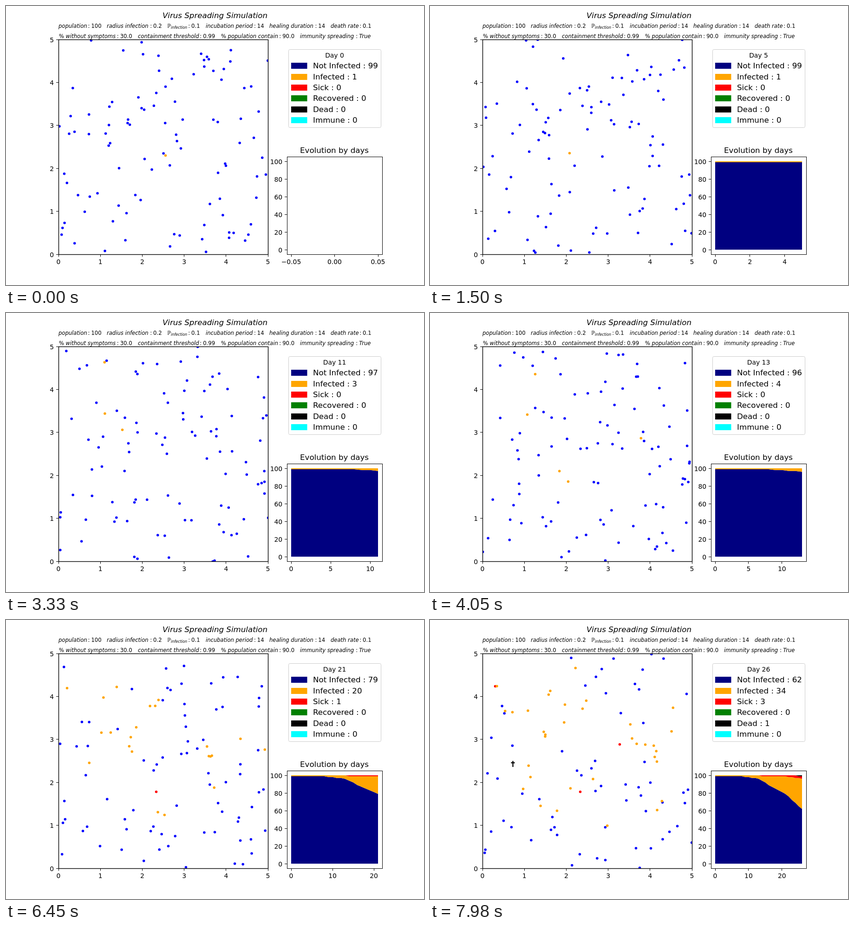
Animation, 900 px wide and 600 px high, one loop 8 s. Source, as an HTML page:

```html
<!DOCTYPE html>
<html lang="en">
<head>
<meta charset="utf-8">
<title>Virus Spreading Simulation</title>
<style>
  html, body { margin: 0; width: 100%; height: 100%; overflow: hidden; background: #fff; }
  svg { display: block; width: 900px; height: 600px; font: 13.89px "DejaVu Sans", sans-serif; }
  .big { font-size: 16.67px; }
  .small { font-size: 11.57px; }
  .it { font-style: italic; }
  .mid { text-anchor: middle; }
  .end { text-anchor: end; }
  .line { fill: none; stroke: #000; }
</style>
</head>
<body>
<svg id="stage" viewBox="0 0 900 600"></svg>
<script>
const LOOP = 8000, STEP = 30, FRAMES = 267, PEOPLE = 100, LAST_DAY = 26;
const BOX = { left: 113, right: 564, top: 72, bottom: 534 };
const stage = document.getElementById('stage');

function add(tag, attrs, text, parent = stage) {
  const el = document.createElementNS('http://www.w3.org/2000/svg', tag);
  for (const key in attrs) el.setAttribute(key, attrs[key]);
  if (text !== undefined) el.textContent = text;
  parent.append(el);
  return el;
}
const label = (x, y, text, cls = '', parent) => add('text', { x, y, class: cls }, text, parent);
const clamp = (v, lo, hi) => Math.min(hi, Math.max(lo, v));

function seeded(seed) {
  return () => {
    seed = (seed + 0x6D2B79F5) | 0;
    let t = Math.imul(seed ^ seed >>> 15, 1 | seed);
    t = t + Math.imul(t ^ t >>> 7, 61 | t) ^ t;
    return ((t ^ t >>> 14) >>> 0) / 4294967296;
  };
}
const random = seeded(20);

// Linear interpolation through keys [time, value, ...]
function along(keys, time) {
  const n = keys.findIndex(key => key[0] > time);
  if (n < 0) return keys.at(-1).slice(1);
  const a = keys[Math.max(0, n - 1)], b = keys[n];
  const k = a === b ? 0 : (time - a[0]) / (b[0] - a[0]);
  return a.slice(1).map((v, i) => v + (b[i + 1] - v) * k);
}

// The first patients: key points [frame, x, y]; each falls sick and stops at the last one
const patients = [
  [[0, 343, 321], [50, 300, 316], [88, 205, 144], [135, 297, 362], [137, 323, 369]],
  [[0, 252, 95], [88, 198, 81], [135, 226, 131], [215, 131, 146], [237, 140, 142]],
  [[0, 228, 206], [135, 209, 218], [217, 178, 309]],
  [[0, 446, 244], [174, 456, 276], [257, 408, 267]]
];
const DEAD = 2, DEAD_FROM = 247;
const stillPeople = [
  [178, 275], [169, 442], [473, 343], [559, 362], [259, 445],
  [278, 406], [460, 414], [343, 173], [446, 139], [540, 366]
];

// Daily totals
const dayAt = frame => Math.min(LAST_DAY, Math.floor((frame + 3) / 10));
const sickFrame = i => i < patients.length ? patients[i].at(-1)[0] : Infinity;
const healthyCurve = [[8, 99], [13, 96], [17, 87], [21, 79], [26, 62]];
const healthyOn = day => Math.round(along(healthyCurve, day)[0]);
function totals(day) {
  const dead = day >= dayAt(DEAD_FROM) ? 1 : 0;
  const sick = patients.filter((_, i) => dayAt(sickFrame(i)) <= day).length - dead;
  const healthy = healthyOn(day);
  return [healthy, PEOPLE - healthy - sick - dead, sick, 0, dead, 0];
}

function walk(x, y, speed) {
  const path = [];
  let heading = random() * Math.PI * 2;
  for (let i = 0; i < FRAMES; i++) {
    path.push([x, y]);
    heading += (random() - 0.5) * 0.5;
    x += speed * Math.cos(heading);
    y += speed * Math.sin(heading);
    if (x < BOX.left || x > BOX.right) heading = Math.PI - heading;
    if (y < BOX.top || y > BOX.bottom) heading = -heading;
    x = clamp(x, BOX.left, BOX.right);
    y = clamp(y, BOX.top, BOX.bottom);
  }
  return path;
}

const guided = keys => Array.from({ length: FRAMES }, (_, f) => along(keys, f));
const paths = [
  ...patients.map(guided),
  ...stillPeople.map(([x, y]) => walk(x, y, 0.03))
];
while (paths.length < PEOPLE) {
  const x = BOX.left + random() * (BOX.right - BOX.left);
  const y = BOX.top + random() * (BOX.bottom - BOX.top);
  paths.push(walk(x, y, 0.2 + 2.6 * random() ** 1.5));
}

// Each new case is the healthy person nearest to an infected one
const infectedFrom = Array(PEOPLE).fill(Infinity);
function nearestHealthy(frame) {
  let best, bestGap = Infinity;
  paths.forEach((path, i) => {
    if (infectedFrom[i] < Infinity) return;
    paths.forEach((other, j) => {
      if (infectedFrom[j] === Infinity) return;
      const gap = Math.hypot(path[frame][0] - other[frame][0], path[frame][1] - other[frame][1]);
      if (gap < bestGap) [best, bestGap] = [i, gap];
    });
  });
  return best;
}
for (let frame = 0, cases = 0; frame < FRAMES; frame++) {
  const day = (frame + 3) / 10, today = healthyOn(Math.floor(day));
  const target = PEOPLE - today + (today - healthyOn(Math.floor(day) + 1)) * (day % 1);
  for (; cases < Math.floor(target); cases++)
    infectedFrom[cases < patients.length ? cases : nearestHealthy(frame)] = frame;
}

// Headings
label(450, 26, 'Virus Spreading Simulation', 'big it mid');
function setting(x, end, y, name, value) {
  if (name[0] === '%') {
    label(x, y, '%', 'small');
    x += 14.6;
    name = name.slice(2);
  }
  if (name) label(x, y, name, 'small it');
  const el = label(end, y, ':', 'small end');
  add('tspan', { dx: 3, class: value === 'True' ? 'it' : '' }, value, el);
}
setting(113, 205.5, 47, 'population', '100');
setting(217, 335.5, 47, 'radius infection', '0.2');
label(347, 47, 'ℙ', 'small');
add('text', { x: 355, y: 49, class: 'it', 'font-size': 8.1 }, 'infection');
setting(347, 417.5, 47, '', '0.1');
setting(430, 555.5, 47, 'incubation period', '14');
setting(567, 687, 47, 'healing duration', '14');
setting(699, 786.5, 47, 'death rate', '0.1');
setting(114, 271.5, 69, '% without symptoms', '30.0');
setting(284, 450, 69, 'containment threshold', '0.99');
setting(463, 621, 69, '% population contain', '90.0');
setting(633, 785.5, 69, 'immunity spreading', 'True');

// Axes
function tickX(x, text, parent) {
  add('path', { d: `M${Math.floor(x) + 0.5} 535v4.4`, class: 'line' }, undefined, parent);
  label(x, 555, text, 'mid', parent);
}
function tickY(x, y, text) {
  add('path', { d: `M${x} ${Math.floor(y) + 0.5}h-4.9`, class: 'line' });
  label(x - 9.8, Math.round(y + 5.6), text, 'end');
}
const clip = add('clipPath', { id: 'field' });
add('rect', { x: 113, y: 72, width: 452, height: 463 }, undefined, clip);
const field = add('g', { 'clip-path': 'url(#field)' });
add('rect', { x: 113.5, y: 72.5, width: 451, height: 462, class: 'line', 'stroke-width': 1.4 });
for (let i = 0; i <= 5; i++) {
  tickX(113 + i * 90.2, i);
  tickY(113, 534 - i * 92.4, i);
}

const layers = ['#000080', '#ffa500', '#f00', '#008000', '#000', '#0ff'];
const areas = layers.map(fill => add('path', { fill }));
const CHART = { left: 614, width: 187, base: 524, unit: 1.9 };
const valueY = v => CHART.base - v * CHART.unit;
add('rect', { x: 605.5, y: 324.5, width: 205, height: 210, class: 'line' });
for (let v = 0; v <= 100; v += 20) tickY(605, valueY(v), v);
label(707, 316, 'Evolution by days', 'big mid');
const dayTicks = add('g', {});

// Legend
add('rect', { x: 608.5, y: 93.5, width: 199, height: 168, rx: 3, fill: '#fff', stroke: '#ccc' });
const dayText = label(707.5, 111, '', 'mid');
const names = ['Not Infected', 'Infected', 'Sick', 'Recovered', 'Dead', 'Immune'];
const legend = names.map((name, i) => {
  const y = Math.floor(134.8 + i * 23.35);
  add('rect', { x: 614, y: y - 12, width: 34.5, height: 13, fill: layers[i] });
  return label(661, y, '', 'big');
});

const dots = paths.map(() => add('circle', { r: 2.75 }, undefined, field));
const cross = add('path', { d: 'M178.5 303v13M174.5 307h8', stroke: '#000', 'stroke-width': 2.3 }, undefined, field);

function drawChart(day) {
  const dayX = d => CHART.left + d / day * CHART.width;
  const history = Array.from({ length: day + 1 }, (_, d) => totals(d));
  const edge = count => history.map((counts, d) =>
    `${dayX(d)} ${valueY(counts.slice(0, count).reduce((a, b) => a + b, 0))}`);
  areas.forEach((area, layer) => {
    const visible = day && history.some(counts => counts[layer]);
    area.setAttribute('d', visible ? `M${[...edge(layer), ...edge(layer + 1).reverse()].join('L')}Z` : '');
  });
  dayTicks.replaceChildren();
  if (!day) {
    ['−0.05', '0.00', '0.05'].forEach((text, i) => tickX(CHART.left + i * CHART.width / 2, text, dayTicks));
    return;
  }
  const step = [0.5, 1, 2, 2.5, 5, 10].find(s => s >= day * 1.1 / 4);
  for (let v = 0; v <= day; v += step) tickX(dayX(v), v.toFixed(step % 1 ? 1 : 0), dayTicks);
}

let shownDay = -1, shownFrame = -1;
function draw(frame) {
  const day = dayAt(frame);
  if (day !== shownDay) {
    shownDay = day;
    dayText.textContent = `Day ${day}`;
    totals(day).forEach((n, i) => legend[i].textContent = `${names[i]} : ${n}`);
    drawChart(day);
  }
  dots.forEach((dot, i) => {
    const [x, y] = paths[i][frame];
    dot.setAttribute('cx', x + 0.5);
    dot.setAttribute('cy', y + 0.5);
    dot.setAttribute('fill', frame >= sickFrame(i) ? '#f00' : frame >= infectedFrom[i] ? '#ffa500' : '#00f');
  });
  const dead = frame >= DEAD_FROM;
  dots[DEAD].setAttribute('visibility', dead ? 'hidden' : 'visible');
  cross.setAttribute('visibility', dead ? 'visible' : 'hidden');
}

function tick() {
  const frame = Math.floor(performance.now() % LOOP / STEP);
  if (frame !== shownFrame) draw(shownFrame = frame);
  requestAnimationFrame(tick);
}
tick();
</script>
</body>
</html>
```
